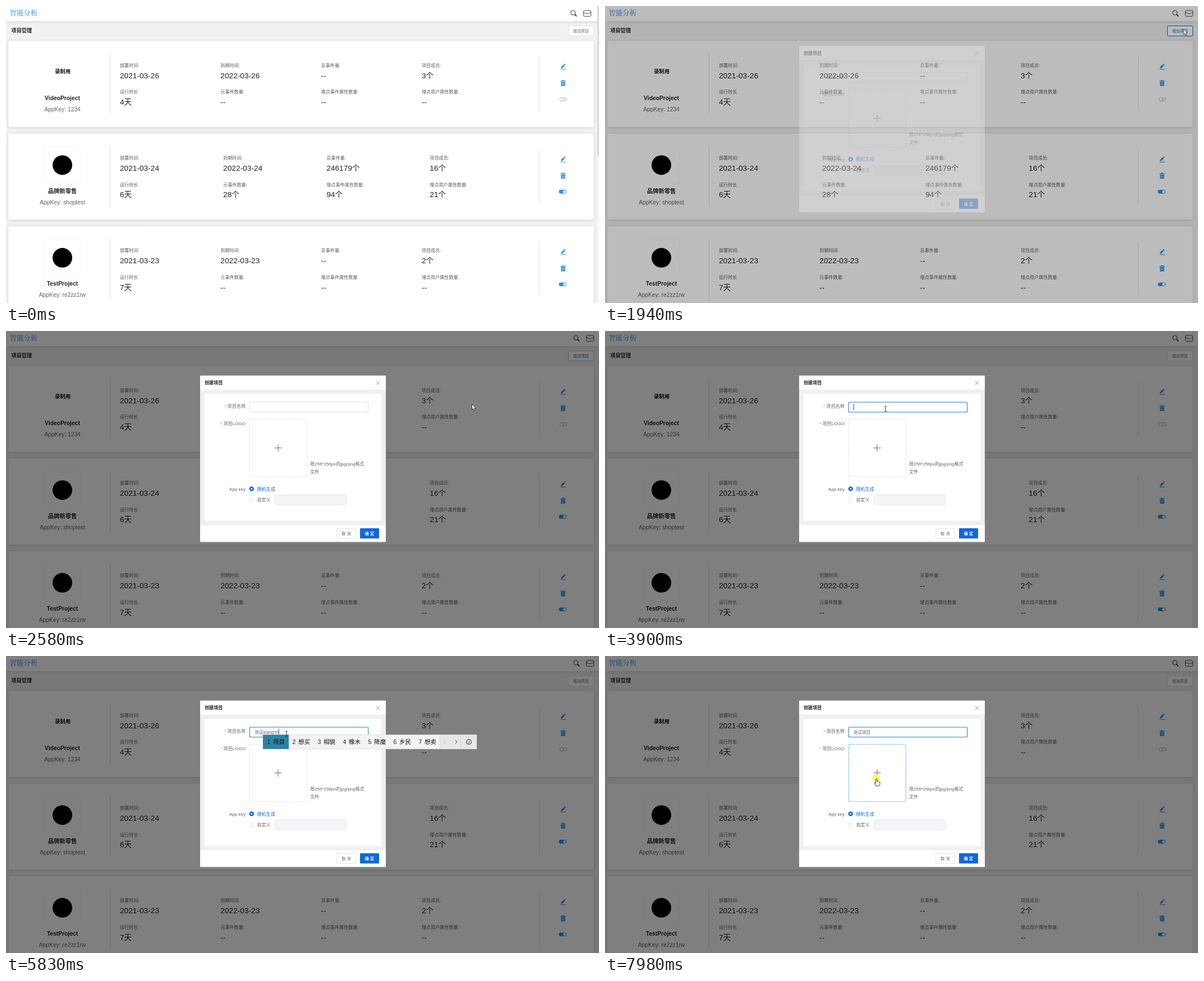
Animation, 1057 px wide and 530 px high, one loop 8 s. Source, as an HTML page:

```html
<!DOCTYPE html>
<html lang="zh-CN">
<head>
<meta charset="utf-8">
<style>
html, body { margin: 0; width: 100%; height: 100%; overflow: hidden; background: #f2f2f2; }
svg { display: block; width: 1057px; height: 530px; font-family: "Liberation Sans", "Noto Sans CJK SC", "Noto Sans CJK", sans-serif; }
text { white-space: pre; }
</style>
</head>
<body>
<svg id="stage" viewBox="0 0 1057 530" xmlns="http://www.w3.org/2000/svg"></svg>
<script>
const LOOP = 8000, BLUE = '#2590ee', DEEP = '#1068dc';

// ---------- markup helpers ----------
const text = (x, y, s, size, fill = '#606266', extra = '') =>
  `<text x="${x}" y="${y + size * 0.36}" font-size="${size}" fill="${fill}" ${extra}>${s}</text>`;
const rect = (x, y, w, h, fill, extra = '') =>
  `<rect x="${x}" y="${y}" width="${w}" height="${h}" fill="${fill}" ${extra}/>`;
const line = (d, color, width = 1, extra = '') =>
  `<path d="${d}" fill="none" stroke="${color}" stroke-width="${width}" ${extra}/>`;
const dot = (x, y, r, fill, extra = '') => `<circle cx="${x}" cy="${y}" r="${r}" fill="${fill}" ${extra}/>`;
const MID = 'text-anchor="middle"', END = 'text-anchor="end"', BOLD = 'font-weight="700"';

// ---------- project cards ----------
const labels = ['部署时间:', '到期时间:', '总事件量:', '项目成员:',
  '运行时长', '元事件数量:', '埋点事件属性数量:', '埋点用户属性数量:'];
const cards = [
  { name: 'VideoProject', key: '1234', cover: '录制用', step: 179.3,
    values: ['2021-03-26', '2022-03-26', '--', '3个', '4天', '--', '--', '--'] },
  { name: '品牌新零售', key: 'shoptest', on: true, step: 184.1,
    values: ['2021-03-24', '2022-03-24', '246179个', '16个', '6天', '28个', '94个', '21个'] },
  { name: 'TestProject', key: 're2zz1rw', on: true, step: 179.3,
    values: ['2021-03-23', '2022-03-23', '--', '2个', '7天', '--', '--', '--'] }
];

const cover = c => c.cover
  ? text(101, 54.5, c.cover, 9.4, '#111', `${MID} ${BOLD}`)
  : rect(68.5, 23.5, 64, 65, '#fff', 'stroke="#f8f8f8"') + dot(100.5, 56, 17.5, '#000');

const toggle = on => on
  ? rect(985.5, 100.2, 13.5, 6.6, BLUE, 'rx="3.3"') + dot(995.6, 103.5, 2.5, '#fff')
  : rect(988, 101, 12, 6, '#e9e9e9', 'rx="3" stroke="#ccc" stroke-width=".7"') +
    dot(990.5, 104, 3.3, '#fff', 'stroke="#aaa" stroke-width=".8"');

const actions = on =>
  line('M988.6 50.5H998', BLUE, 1) +
  `<path d="M989 48.9l.7-2.8 4-4 2.2 2.2-4 4zM994.3 41.4l1.2-1.2 2.2 2.2-1.2 1.2z" fill="${BLUE}"/>` +
  rect(989.3, 73, 7.4, 7.2, BLUE, 'rx=".6"') +
  line('M988 71.8H998M991.2 71.8V70.2H994.8V71.8', BLUE, 1.1) +
  line('M991.6 74.6V78.6M994.4 74.6V78.6', '#fff', 0.8) +
  toggle(on);

const card = (c, i) => `<g transform="translate(0 ${62.5 + i * 165.4})">` +
  rect(4.5, 0, 1043, 153, '#fff', 'rx="2" filter="url(#shade)"') + cover(c) +
  text(100.5, 102.2, c.name, 10.3, '#222', `${MID} ${BOLD}`) +
  text(100.5, 122.2, 'AppKey: ' + c.key, 10.3, '#606266', MID) +
  line('M185.5 22.5V129.5M950.5 28.5V123.5', '#dfe1e6') +
  labels.map((s, k) => {
    const x = 203 + c.step * (k % 4), y = k < 4 ? 43.2 : 90.7;
    return text(x, y, s, 8.1, '#5c5c5c') + text(x, y + 17.9, c.values[k], 13.7, '#222');
  }).join('') + actions(c.on) + '</g>';

// ---------- page ----------
const page = rect(0, 0, 1057, 530, '#f2f2f2') + cards.map(card).join('') +
  rect(0, 0, 1057, 27, '#fff', 'filter="url(#shade)"') +
  text(6.5, 12.7, '智能分析', 12.4, '#6caeea', `${BOLD} font-family="Noto Serif CJK SC, Noto Sans CJK SC, sans-serif"`) +
  text(9.5, 43.8, '项目管理', 9.2, '#222', BOLD) +
  `<g id="tools">${dot(1010.8, 12, 4, 'none', 'stroke="#333"')}` +
  line('M1013.8 15L1017 18.3', '#333', 1.8) +
  rect(1029.5, 8, 13.2, 10.4, 'none', 'rx="2" stroke="#444"') +
  line('M1029.5 11.5Q1036 15.8 1042.7 11.5', '#444') + '</g>' +
  '<g id="add">' + rect(1002.5, 35.5, 45, 18, '#fff', 'rx="1.5"') +
  text(1025, 44.6, '增加项目', 7.1, '#606266', MID) + '</g>' +
  '<g id="bar">' + rect(1054, 0, 3, 530, '#f5f5f5') + rect(1054, 0, 3, 267, '#d8d8de') + '</g>';

// ---------- dialog ----------
const dialog = rect(346, 79.5, 331, 297, '#fff', 'rx="1"') + rect(346, 104.5, 331, 242, '#f0f0f0') +
  rect(354, 112.5, 315, 226, '#fff') +
  text(354, 92, '创建项目', 8.1, '#222', BOLD) +
  line('M659.6 89.2L666.4 96M666.4 89.2L659.6 96', '#888', 0.9) +
  ['项目名称', '项目LOGO'].map((s, i) =>
    text(427, 134 + i * 31, `<tspan fill="#f56c6c">* </tspan>${s}`, 8.1, '#606266', END)).join('') +
  rect(434.2, 127, 211.5, 17.8, '#fff', 'id="field" rx="2"') +
  rect(434.3, 157.8, 102, 102, '#fff', 'id="drop" rx="2" stroke-dasharray="2 1.4"') +
  line('M478.5 208.7H491.5M485 202.2V215.2', '#666', 1) +
  text(542, 237, '限256*256px的jpg/png格式', 8, '#606266') + text(542, 251.6, '文件', 8, '#606266') +
  text(427, 282, 'App key', 8, '#606266', END) +
  dot(437.8, 281.6, 4.2, DEEP) + dot(437.8, 281.6, 1.5, '#fff') +
  text(447.4, 281.6, '随机生成', 8.1, DEEP) +
  dot(437.8, 301.3, 3.8, '#fff', 'stroke="#dcdfe6" stroke-width=".8"') +
  text(447.4, 301.3, '自定义', 8.1) +
  rect(479.5, 292.5, 127, 17.5, '#f3f5f8', 'rx="2" stroke="#e1e4ea" stroke-width=".9"') +
  rect(589.7, 352.3, 33.6, 17.8, '#fff', 'rx="1.5" stroke="#dcdfe6" stroke-width=".9"') +
  text(606.5, 361.4, '取 消', 7.2, '#606266', MID) +
  rect(631, 352, 34, 18.3, DEEP, 'rx="1.5"') + text(648, 361.4, '确 定', 7.2, '#fff', `${MID} ${BOLD}`) +
  text(443, 135.8, '<tspan id="done"></tspan><tspan id="draft" font-size="8.2"></tspan>', 7.5, '#606266', 'id="entry"') +
  rect(443, 130, 0.9, 11, '#333', 'id="caret"');

const pointers = {
  arrow: '<path d="M0 0V10L2.3 7.9L3.9 11.4L5.5 10.7L4 7.3H7Z" fill="#fff" stroke="#222" stroke-width=".8"/>',
  beam: line('M-2 -4.8H-.5L0 -4.3L.5 -4.8H2M0 -4.3V4.3M-2 4.8H-.5L0 4.3L.5 4.8H2', '#222', 0.9),
  hand: '<path d="M-1.1 .6Q0 -.8 1.1 .6V5Q2.2 4.2 3 5.4Q4 4.8 4.6 5.9Q5.8 5.4 6 7V9.4Q5.8 11.4 4.6 12.8H-1L-4 8.4Q-4.2 6.8 -2.6 7.4L-1.1 8.6Z" fill="#fff" stroke="#222" stroke-width=".9"/>'
};

document.getElementById('stage').innerHTML =
  '<defs><filter id="shade" x="-5%" y="-20%" width="110%" height="150%">' +
  '<feDropShadow dx="0" dy="1" stdDeviation="3" flood-opacity=".13"/></filter></defs>' +
  page + rect(0, 0, 1057, 530, '#000', 'id="mask"') + `<g id="dialog">${dialog}</g><g id="popup"></g>` +
  dot(0, 0, 7, '#fff74a', 'id="ring"') +
  '<g id="pointer">' + Object.entries(pointers).map(([k, s]) => `<g id="${k}">${s}</g>`).join('') + '</g>';

const el = id => document.getElementById(id);
const set = (node, attrs) => { for (const k in attrs) node.setAttribute(k, attrs[k]); };
const show = (id, on) => set(el(id), { visibility: on ? 'visible' : 'hidden' });
const [addBox, addText] = el('add').children;

// ---------- motion ----------
const clamp = v => Math.max(0, Math.min(1, v));
const smooth = p => p * p * (3 - 2 * p);
const span = (t, from, length) => clamp((t - from) / length);

// CSS "ease": cubic-bezier(.25, .1, .25, 1)
function ease(p) {
  const curve = (u, a, b) => 3 * a * u * (1 - u) ** 2 + 3 * b * u * u * (1 - u) + u ** 3;
  let lo = 0, hi = 1;
  for (let i = 0; i < 18; i++) {
    const m = (lo + hi) / 2;
    if (curve(m, 0.25, 0.25) < p) lo = m; else hi = m;
  }
  return curve(lo, 0.1, 1);
}
const mix = (a, b, p) => `rgb(${a.map((v, i) => Math.round(v + (b[i] - v) * p))})`;

// start, length, then start point, control point and end point
const moves = [
  [440, 820, [906, 532], [1100, 330], [1031, 41]],
  [2410, 450, [1031, 41], [700, 222], [500, 139]],
  [7250, 290, [500, 139], [496, 180], [484, 219]]
];
function pointerAt(t) {
  const [from, length, a, b, c] = moves.filter(m => t >= m[0]).pop() || moves[0];
  const p = smooth(span(t, from, length));
  return a.map((v, i) => v * (1 - p) ** 2 + 2 * b[i] * p * (1 - p) + c[i] * p * p);
}
const clicks = [[1590, 1031, 42], [2860, 500, 139], [7945, 483, 218.5]];

// time, committed text, text being composed, candidates
const typing = [
  [0, '', ''],
  [4000, '', 'c'],
  [4030, '', 'c', '才从此次错车出'],
  [4110, '', 'ce', '测策侧册厕恻车'],
  [4400, '', "ce's", '测试 厕所 测算 测速 侧室 策士 侧身'],
  [4500, '', "ce'sh", '测试 厕所 侧室 策士 侧身 测时 侧视'],
  [4610, '', "ce'shi", '测试 侧室 策士 测时 侧视 测式 策试'],
  [5120, '测试', ''],
  [5330, '测试', 'x'],
  [5360, '测试', 'x', '想下小先向新行'],
  [5460, '测试', 'xi', '系西洗细喜息席'],
  [5630, '测试', 'xian', '先现线县显险闲'],
  [5730, '测试', 'xiang', '想像向项相箱响'],
  [5830, '测试', "xiang'm", '项目 想买 相貌 橡木 降魔 乡民 想卖'],
  [6060, '测试', "xiang'mu", '项目 橡木 相幕 香木 详目 乡墓 象目'],
  [6200, '测试项目', '']
];

function popup(x, list) {
  if (!list) return '';
  const words = list.includes(' ') ? list.split(' ') : [...list];
  const w = 24 + 10.5 * words[0].length, nav = x + w * 7;
  return rect(x, 140.5, w * 7 + 66, 25.5, '#f3f3f3', 'stroke="#ccc" stroke-width=".6"') +
    rect(nav, 140.8, 66, 25, '#e7e7e7') + rect(x, 140.5, w + 1, 25.5, '#2c83a5') +
    words.map((s, i) => text(x + i * w + 7.5, 153.3, i + 1, 10.5, '#222') +
      text(x + i * w + 18, 153.3, s, 10.5, '#111')).join('') +
    line(`M${nav + 0.5} 141V166M${nav + 37.5} 141V166`, '#d2d2d2', 0.7) +
    line(`M${nav + 11} 150.3l-3 3l3 3`, '#aaa', 0.9) + line(`M${nav + 28} 150.3l3 3l-3 3`, '#222', 1) +
    dot(nav + 52, 153.3, 4.6, 'none', 'stroke="#222" stroke-width=".9"') +
    dot(nav + 50.4, 152, 0.7, '#222') + dot(nav + 53.6, 152, 0.7, '#222') +
    line(`M${nav + 49.5} 154.6q2.5 2.6 5 0`, '#222', 0.8);
}

let shown;
function drawEntry(t) {
  const state = typing.filter(s => t >= s[0]).pop();
  if (state !== shown) {
    const [, done, draft, list] = shown = state;
    el('done').textContent = done;
    el('draft').textContent = draft;
    el('popup').innerHTML = popup(443 + 7.5 * done.length, list);
    set(el('caret'), { x: state[0] ? 442.7 + el('entry').getComputedTextLength() : 443 });
  }
  show('caret', (t >= 2890 && t < 3390) || (t >= 3900 && t < 6750) || (t >= 7270 && t < 7790));
}

function draw(t) {
  const open = t >= 1880, fade = ease(span(t, 1880, 300));
  set(el('tools'), { transform: `translate(${open ? 5 : 0} 0)` });
  show('bar', !open);
  set(el('mask'), { opacity: 0.5 * ease(span(t, 1880, 200)) });
  set(el('dialog'), { opacity: fade, transform: `translate(0 ${-12 * (1 - fade)})` });

  const hover = ease(span(t, 1270, 180)) - ease(span(t, 2500, 180));
  set(addBox, { stroke: mix([220, 223, 230], [16, 104, 220], hover) });
  set(addText, { fill: mix([96, 98, 102], [16, 104, 220], hover) });
  const focus = ease(span(t, 2860, 180));
  set(el('field'), { stroke: mix([215, 219, 226], [35, 125, 220], focus), 'stroke-width': 0.9 + 0.2 * focus });

  const [x, y] = pointerAt(t);
  const overDrop = t > 7250 && y > 157;
  const kind = overDrop ? 'hand' : t > 2410 && x < 646 && y > 126 && y < 146 ? 'beam' : 'arrow';
  set(el('drop'), { stroke: overDrop ? '#409eff' : '#d9d9d9', 'stroke-width': overDrop ? 1.1 : 0.9 });
  set(el('pointer'), { transform: `translate(${x} ${y})` });
  for (const k in pointers) show(k, k === kind && t >= 460);

  const click = clicks.find(c => t >= c[0] && t < c[0] + 200);
  show('ring', click);
  if (click) {
    const age = t - click[0];
    set(el('ring'), { cx: click[1], cy: click[2], r: 7 * clamp(0.5 + age / 50), opacity: 0.85 * (1 - span(age, 100, 100)) });
  }
  drawEntry(t);
}

const start = performance.now();
(function tick() {
  draw((performance.now() - start) % LOOP);
  requestAnimationFrame(tick);
})();
</script>
</body>
</html>
```
